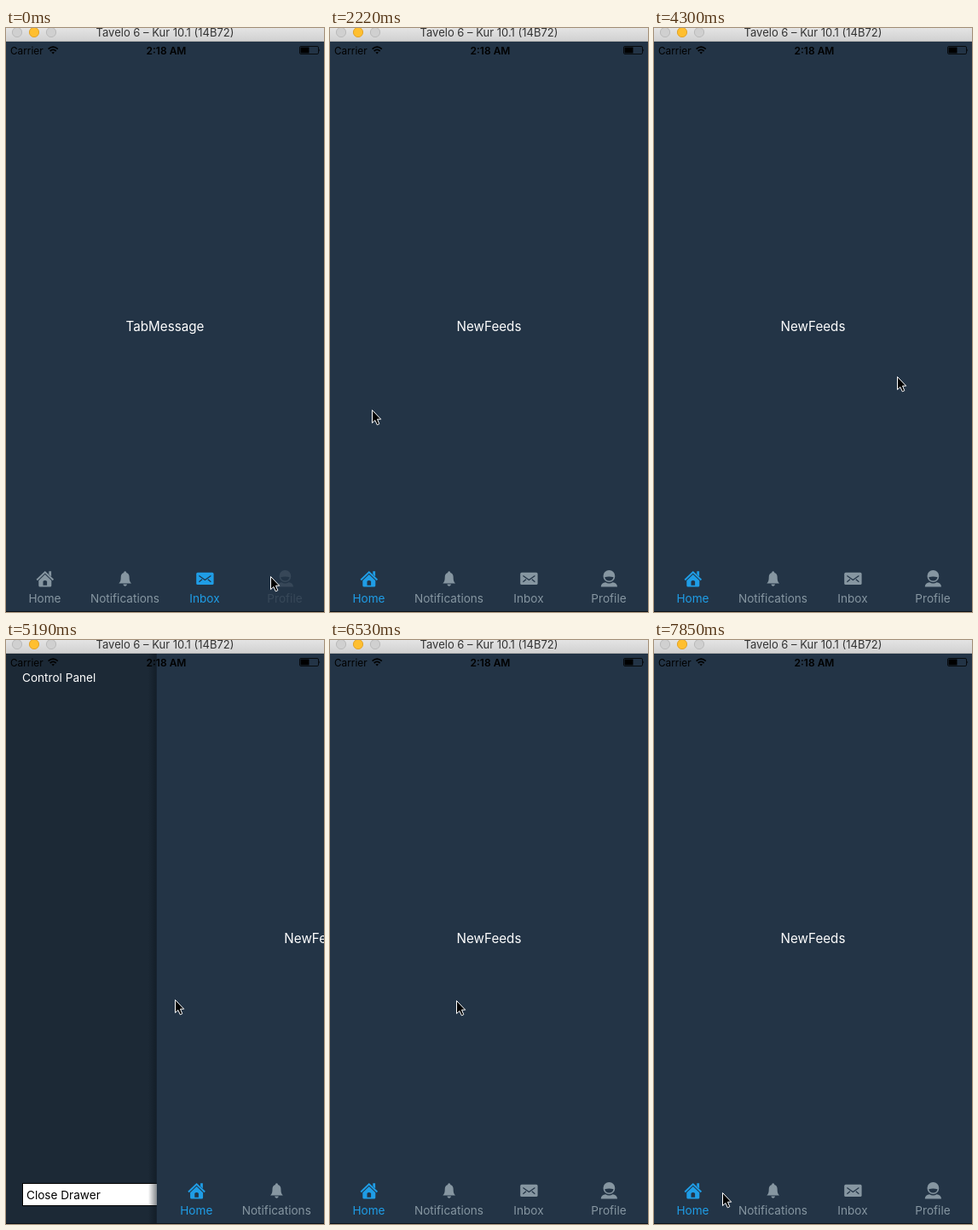
Animation, 373 px wide and 684 px high, one loop 8000 ms. Source, as an HTML page:

```html
<!DOCTYPE html>
<html lang="en">
<head>
<meta charset="utf-8">
<title>Drawer demo</title>
<style>
  html, body { margin: 0; width: 100%; height: 100%; overflow: hidden; background: #233446; }
  svg { display: block; width: 100vw; height: 100vh; }
  text { font-family: Inter, Roboto, "Liberation Sans", sans-serif; font-size: 13.6px; }
  .mid { text-anchor: middle; }
  .light { fill: #fff; }
  .tab { color: #8696a1; fill: currentColor; }
  .tab.on { color: #1f9de6; }
  .tab.down { opacity: .2; }
  .cut { fill: #233446; }
  .cutline { fill: none; stroke: #233446; stroke-width: 1.2; }
</style>
</head>
<body>
<svg viewBox="0 0 373 684" preserveAspectRatio="none">
  <defs>
    <linearGradient id="bar" x2="0" y2="1">
      <stop stop-color="#e4e4e4"/><stop offset="1" stop-color="#d0d0d0"/>
    </linearGradient>
    <linearGradient id="shade">
      <stop stop-color="#0a121a" stop-opacity="0"/>
      <stop offset="1" stop-color="#0a121a" stop-opacity=".5"/>
    </linearGradient>
  </defs>

  <!-- drawer -->
  <rect y="16" width="373" height="668" fill="#1c2936"/>
  <text class="light" x="19" y="49.3">Control Panel</text>
  <rect x="19.5" y="636.5" width="234" height="26" fill="#fff" stroke="#000"/>
  <text x="24" y="654.5">Close Drawer</text>

  <!-- main view -->
  <g id="main">
    <rect x="-11" y="16" width="10" height="668" fill="url(#shade)"/>
    <rect x="-1" y="16" width="375" height="668" fill="#233446"/>
    <text id="title" class="mid light" x="186.5" y="355.2" style="font-size:15.2px"></text>

    <g class="tab" transform="translate(45.5 645)">
      <path d="M-9.3 1.4 L.3 -7.7 L9.9 1.4" fill="none" stroke="currentColor" stroke-width="2"/>
      <path d="M4.8 -8.8 H7.6 V-2.6 L4.8 -5.2 Z"/>
      <path d="M-7.2 2.2 L.3 -4.9 L7.8 2.2 V8 Q7.8 9.6 6.2 9.6 H-5.6 Q-7.2 9.6 -7.2 8 Z"/>
      <path class="cut" d="M-2 7.8 V3 Q.3 .8 2.6 3 V7.8 Z"/>
      <text class="mid" y="28">Home</text>
    </g>
    <g class="tab" transform="translate(139.5 645)">
      <path transform="translate(.2 .2) scale(.94)" d="M0 -9.4 C1.2 -9.4 1.6 -8.6 1.6 -7.7 C4.4 -6.9 5.3 -4.6 5.3 -2 C5.3 2.4 6.1 3.8 7.8 5.6 H-7.8 C-6.1 3.8 -5.3 2.4 -5.3 -2 C-5.3 -4.6 -4.4 -6.9 -1.6 -7.7 C-1.6 -8.6 -1.2 -9.4 0 -9.4 Z M-2.4 6.8 H2.4 C2.1 8.3 1.2 9 0 9 S-2.1 8.3 -2.4 6.8 Z"/>
      <text class="mid" y="28">Notifications</text>
    </g>
    <g class="tab" transform="translate(233 645)">
      <rect x="-9.8" y="-7.2" width="20.4" height="14.2" rx="1.6"/>
      <path class="cutline" d="M-6.6 -3.6 L.4 1.4 L7.4 -3.6 M-6.6 3.8 L-3 .8 M7.4 3.8 L3.8 .8"/>
      <text class="mid" y="28">Inbox</text>
    </g>
    <g class="tab" transform="translate(327 645)">
      <circle cx=".4" cy="-3" r="6.9"/>
      <path class="cut" d="M-4.8 -1.8 Q.4 -3.4 5.6 -1.8 Q4.4 2.6 .4 2.6 T-4.8 -1.8 Z"/>
      <path d="M-9.2 9.5 C-9 6 -6.8 4.8 -3.8 4.3 C-1.4 5.9 2.2 5.9 4.6 4.3 C7.6 4.8 9.8 6 10 9.5 Z"/>
      <text class="mid" y="28">Profile</text>
    </g>
  </g>

  <!-- status bar -->
  <text x="5" y="30.6" style="font-size:11.8px">Carrier</text>
  <g fill="none" stroke="#000" stroke-width="1.7">
    <path d="M49.6 24.6 Q55.2 19.6 60.8 24.6 M51.7 27 Q55.2 23.9 58.7 27"/>
    <path d="M55.2 30.6 L53.4 28.6 Q55.2 27.2 57 28.6 Z" fill="#000" stroke="none"/>
  </g>
  <text class="mid" x="188" y="30.6" style="font-size:12px;font-weight:600">2:18 AM</text>
  <rect x="344.5" y="21.5" width="22" height="9" rx="1.4" fill="none" stroke="#000" stroke-width=".8"/>
  <path d="M345.5 22.5 H355.5 V29.5 H345.5 Z M367.4 24.3 Q369 26 367.4 27.7 Z"/>

  <!-- window frame -->
  <rect width="373" height="16" fill="url(#bar)"/>
  <rect y="15" width="373" height="1" fill="#b4b4b4"/>
  <g fill="#d0d0d0" stroke="#bababa">
    <circle cx="13" cy="5" r="5.6"/>
    <circle cx="33" cy="5" r="5.6" fill="#ffbf2f" stroke="#e2a32a"/>
    <circle cx="53" cy="5" r="5.6"/>
  </g>
  <text class="mid" x="186.5" y="10.2" fill="#333" style="font-size:13px">Tavelo 6 – Kur 10.1 (14B72)</text>
  <rect y="683" width="373" height="1" fill="#0c1219"/>

  <path id="cursor" d="M.5 .5 V15.6 L3.9 12.5 L6.3 17.8 L8.8 16.7 L6.5 11.2 H10.7 Z"
        fill="#000" stroke="#fff" stroke-linejoin="round"/>
</svg>

<script>
const LOOP = 8000, TICKS = 54;      // the screen refreshes in even ticks
const OPEN = 275, SETTLE = 1.7;     // drawer width, ticks to snap after release
const HOME = 0, INBOX = 2, PROFILE = 3;
const titles = { [HOME]: 'NewFeeds', [INBOX]: 'TabMessage', [PROFILE]: 'TabProfile' };

const $ = id => document.getElementById(id);
const main = $('main'), title = $('title'), cursor = $('cursor');
const tabs = [...document.querySelectorAll('.tab')];

// where the hand comes to rest
const stops = [
  { n: 1, x: 310, y: 642 }, { n: 8, x: 100, y: 655 }, { n: 12, x: 42, y: 655 },
  { n: 15, x: 49, y: 446.5 }, { n: 21, x: 243, y: 404 }, { n: 24, x: 345, y: 411 },
  { n: 29, x: 285, y: 408 }, { n: 33, x: 20, y: 424 }, { n: 39, x: 340, y: 419 },
  { n: 42, x: 148, y: 422 }, { n: 44, x: 148, y: 422 }, { n: 46, x: 15, y: 423 },
  { n: 48, x: 165, y: 440 }, { n: 49.4, x: 81, y: 645 }, { n: 53, x: 80, y: 647 }
];

// drags that open or close the drawer; the last one is a tap on the button
const drags = [
  { grab: 15, drop: 19, to: OPEN }, { grab: 24, drop: 26, to: 0 },
  { grab: 33, drop: 35.5, to: OPEN }, { grab: 39, drop: 40.3, to: 0 },
  { grab: 46, drop: 47.5, to: OPEN }, { grab: 49.4, drop: 49.4, to: 0 }
];

const clamp = (v, lo, hi) => Math.min(hi, Math.max(lo, v));
const easeOut = u => 1 - (1 - u) ** 2;
const mix = (a, b, u) => a + (b - a) * u;

function hand(n) {
  const i = stops.findIndex(s => s.n >= n);
  if (i < 1) return stops[0];
  const a = stops[i - 1], b = stops[i];
  const u = easeOut((n - a.n) / (b.n - a.n));
  return { x: mix(a.x, b.x, u), y: mix(a.y, b.y, u) };
}

function offset(n) {
  const drag = drags.findLast(d => d.grab <= n);
  if (!drag) return 0;
  const pull = hand(Math.min(n, drag.drop)).x - hand(drag.grab).x;
  const held = clamp(OPEN - drag.to + pull, 0, OPEN);
  return mix(held, drag.to, easeOut(clamp((n - drag.drop) / SETTLE, 0, 1)));
}

function draw(n) {
  const active = n < 1 ? INBOX : n < 12 ? PROFILE : HOME;
  const pressed = n < 1 ? PROFILE : n === 11 ? HOME : -1;
  tabs.forEach((tab, i) => {
    tab.classList.toggle('on', i === active);
    tab.classList.toggle('down', i === pressed);
  });
  title.textContent = titles[active];
  const { x, y } = hand(n);
  main.setAttribute('transform', `translate(${offset(n)} 0)`);
  cursor.setAttribute('transform', `translate(${Math.round(x)} ${Math.round(y)})`);
}

const start = performance.now();
function frame() {
  const t = (performance.now() - start) % LOOP;
  draw(Math.floor(t / LOOP * TICKS + .03) % TICKS);
  requestAnimationFrame(frame);
}
frame();
</script>
</body>
</html>
```
